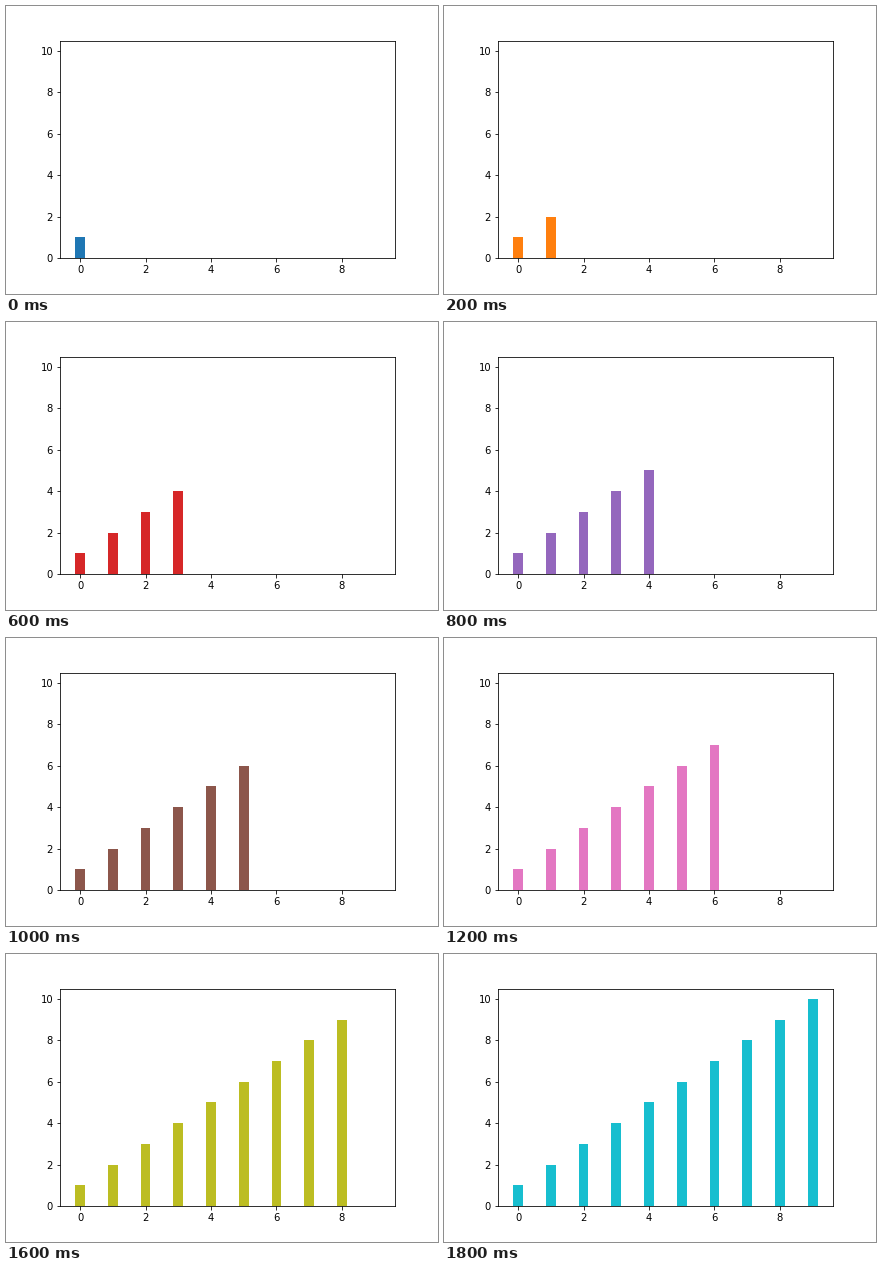
Write a matplotlib script that moves like this. It is 432x288 px and loops after 2000 ms.

```python
import matplotlib.pyplot as plt
from matplotlib.animation import FuncAnimation

COUNT = 10
STEP_MS = 200

plt.rcParams["font.family"] = "DejaVu Sans"
plt.rcParams["font.size"] = 10

fig, ax = plt.subplots(figsize=(6, 4), dpi=72)
fig.subplots_adjust(left=0.125, right=0.9, bottom=0.125, top=0.88)

bars = ax.bar(range(COUNT), range(1, COUNT + 1), width=0.3)
ax.set_xlim(-0.615, 9.615)
ax.set_ylim(0, 10.5)
ax.set_xticks(range(0, 10, 2))
ax.set_yticks(range(0, 11, 2))


def update(step):
    """Show one more bar per step and recolour the whole series."""
    for i, bar in enumerate(bars):
        bar.set_visible(i <= step)
        bar.set_facecolor(f"C{step}")
    return list(bars)


anim = FuncAnimation(fig, update, frames=COUNT, interval=STEP_MS,
                     repeat=True, repeat_delay=0, blit=False)

plt.show()
```
